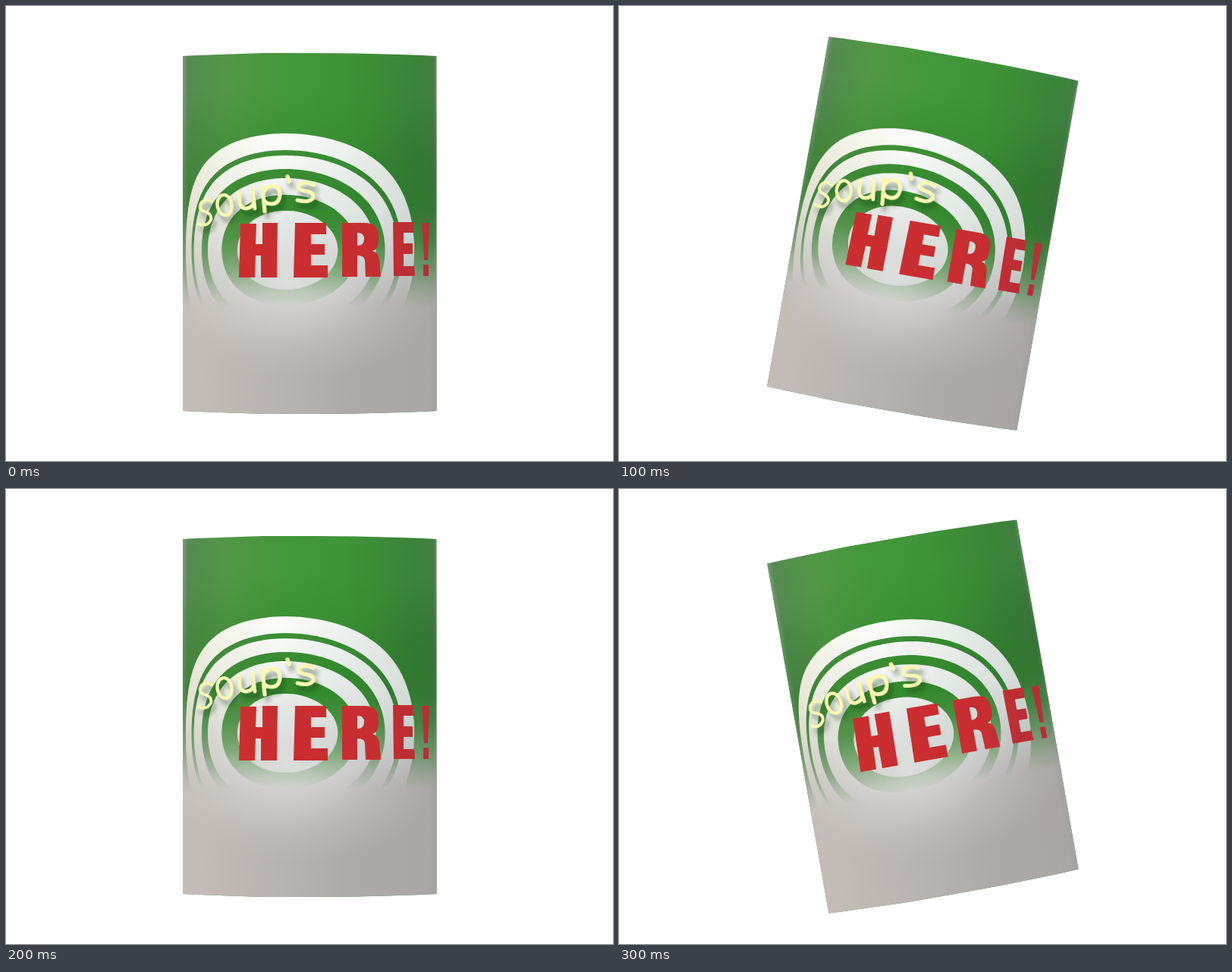
Write an HTML page that moves like this. It is 800 px wide and 600 px high and loops after 0.4 s.

```html
<!DOCTYPE html>
<html lang="en">
<head>
<meta charset="utf-8">
<title>Wobbling soup can</title>
<style>
  html, body { margin: 0; width: 100%; height: 100%; overflow: hidden; background: #fff; }
  svg { display: block; width: 100%; height: 100%; }
</style>
</head>
<body>
<svg viewBox="0 0 800 600" role="img" aria-label="Soup's HERE!">
  <defs>
    <clipPath id="body">
      <path d="M233 66L252 65L281 64L339 62H407L461 62.500L519 64L548 65L567.500 66V534L548 535L519 536L461 537.500L407 538H339L281 536L252 535L233 534Z"/>
    </clipPath>
    <linearGradient id="green" gradientUnits="userSpaceOnUse" x1="233" y1="0" x2="568" y2="0">
      <stop offset="0" stop-color="#7b9a78"/>
      <stop offset=".02" stop-color="#568a51"/>
      <stop offset=".18" stop-color="#529647"/>
      <stop offset=".4" stop-color="#43983a"/>
      <stop offset=".65" stop-color="#3f9338"/>
      <stop offset=".9" stop-color="#3b8439"/>
      <stop offset=".985" stop-color="#407f40"/>
      <stop offset="1" stop-color="#6a8c69"/>
    </linearGradient>
    <linearGradient id="depth" x1="0" y1="0" x2="0" y2="1">
      <stop offset=".15" stop-color="#1e761a" stop-opacity="0"/>
      <stop offset=".55" stop-color="#1e761a" stop-opacity=".38"/>
      <stop offset="1" stop-color="#1e761a" stop-opacity=".2"/>
    </linearGradient>
    <radialGradient id="shade" gradientUnits="userSpaceOnUse" cx="570" cy="225" r="110">
      <stop offset="0" stop-color="#35603a" stop-opacity=".35"/>
      <stop offset="1" stop-color="#35603a" stop-opacity="0"/>
    </radialGradient>
    <linearGradient id="white" gradientUnits="userSpaceOnUse" x1="236" y1="0" x2="540" y2="0">
      <stop offset="0" stop-color="#efebd4"/>
      <stop offset=".14" stop-color="#f6f6e9"/>
      <stop offset=".4" stop-color="#fbfcfa"/>
      <stop offset=".7" stop-color="#eef2ef"/>
      <stop offset="1" stop-color="#dbe1dd"/>
    </linearGradient>
    <linearGradient id="dim" gradientUnits="userSpaceOnUse" x1="0" y1="175" x2="0" y2="340">
      <stop offset="0" stop-color="#bfc9c4" stop-opacity="0"/>
      <stop offset="1" stop-color="#bfc9c4" stop-opacity=".45"/>
    </linearGradient>
    <linearGradient id="gray" gradientUnits="userSpaceOnUse" x1="233" y1="0" x2="568" y2="0">
      <stop offset="0" stop-color="#c3bcb4"/>
      <stop offset=".07" stop-color="#c2bcb7"/>
      <stop offset=".35" stop-color="#b8b4b2"/>
      <stop offset=".65" stop-color="#aeaaa8"/>
      <stop offset=".97" stop-color="#a9a6a5"/>
      <stop offset="1" stop-color="#a3a1a1"/>
    </linearGradient>
    <radialGradient id="glow" gradientUnits="userSpaceOnUse" cx="375" cy="365" r="200" gradientTransform="matrix(1 0 0 .65 0 128)">
      <stop offset="0" stop-color="#dfe0df" stop-opacity=".9"/>
      <stop offset=".4" stop-color="#d5d4d3" stop-opacity=".65"/>
      <stop offset="1" stop-color="#c0bdbb" stop-opacity="0"/>
    </radialGradient>
    <linearGradient id="fade" gradientUnits="userSpaceOnUse" x1="0" y1="270" x2="0" y2="396">
      <stop offset="0" stop-color="#000"/>
      <stop offset=".3" stop-color="#262626"/>
      <stop offset=".6" stop-color="#757575"/>
      <stop offset=".85" stop-color="#d4d4d4"/>
      <stop offset="1" stop-color="#fff"/>
    </linearGradient>
    <mask id="lower" maskUnits="userSpaceOnUse" x="230" y="60" width="340" height="480">
      <rect x="230" y="60" width="340" height="480" fill="url(#fade)"/>
    </mask>
    <linearGradient id="red" x1="0" y1="0" x2="1" y2="0">
      <stop offset="0" stop-color="#cc2e2f"/>
      <stop offset=".7" stop-color="#c72d31"/>
      <stop offset="1" stop-color="#b52f36"/>
    </linearGradient>
    <filter id="blur" x="-20%" y="-40%" width="140%" height="180%"><feGaussianBlur stdDeviation="3"/></filter>
    <!-- Hand lettering, wrapped around the can: strokes thin out towards the edge -->
    <g id="soup" fill="none" stroke-linecap="round" stroke-linejoin="round">
      <path stroke-width="3.800" d="M271 258Q263 252 257 260Q253 269 262 271Q272 274 270 282Q265 292 254 287"/>
      <ellipse stroke-width="4.300" cx="288" cy="262.500" rx="9.500" ry="13.500" transform="rotate(-8 288 262)"/>
      <path stroke-width="4.800" d="M307 246L308 259Q310 268 317 267Q326 266 327 256M325 242L328 267"/>
      <path stroke-width="5.200" d="M338 239L341 271M339 247Q342 237 351 237Q361 238 361 249Q360 261 350 261Q343 261 340 256"/>
      <path stroke-width="5.500" d="M371 225L373 231"/>
      <path stroke-width="5" d="M405 236Q394 230 387 235Q382 242 394 244Q407 246 405 253Q400 260 384 256"/>
    </g>
  </defs>

  <g id="can" clip-path="url(#body)">
    <rect x="230" y="60" width="340" height="480" fill="url(#green)"/>
    <rect x="230" y="60" width="340" height="340" fill="url(#depth)"/>
    <rect x="430" y="90" width="140" height="300" fill="url(#shade)"/>
    <path class="rings" fill="url(#white)" fill-rule="evenodd"/>
    <path class="rings" fill="url(#dim)" fill-rule="evenodd"/>
    <g mask="url(#lower)">
      <rect x="230" y="260" width="340" height="280" fill="url(#gray)"/>
      <rect x="230" y="230" width="340" height="310" fill="url(#glow)"/>
    </g>
    <use href="#soup" x="4" y="7" stroke="#123a12" opacity=".5" filter="url(#blur)"/>
    <use href="#soup" stroke="#faf7b2"/>
    <path fill="url(#red)" fill-rule="evenodd" d="
      M309 287H330L329 314H338V286H358L357 358H336V329H329L328 358H307Z
      M381 286H422V301H402V314H420V328H402V342H424V358H379Z
      M443 286H472Q491 286 491 303V309Q491 321 483 323Q491 325 492 335L494 357H474L473 336Q473 329 463 329V357H443Z
      M463 299V316Q472 316 472 307Q472 299 463 299Z
      M510 285H537V299H524V313H536V327H524V343H538L539 356H511Z
      M548 286H558L556 335H551Z M550 341H557V356H550Z"/>
  </g>
</svg>
<script>
  const RADIUS = 167, AXIS = 400, FACING = -0.19, RING_Y = 322;

  // Flat ellipse of the given height, wrapped around the can.
  function wrappedEllipse(height) {
    const spread = 0.0082 * height - 0.0000042 * height ** 2;
    const points = Array.from({ length: 120 }, (_, i) => {
      const a = i / 120 * 2 * Math.PI;
      const x = AXIS + RADIUS * Math.sin(FACING + spread * Math.cos(a));
      return `${x.toFixed(1)} ${(RING_Y + height * Math.sin(a)).toFixed(1)}`;
    });
    return `M${points.join('L')}Z`;
  }

  const outline = [154, 132, 125, 107, 95, 73, 52].map(wrappedEllipse).join('');
  document.querySelectorAll('.rings').forEach(ring => ring.setAttribute('d', outline));

  const can = document.getElementById('can');
  const tilts = [0, 10, 0, -10];
  const start = performance.now();

  function draw() {
    const step = Math.floor((performance.now() - start) / 100) % tilts.length;
    can.setAttribute('transform', `rotate(${tilts[step]} 400 300)`);
    requestAnimationFrame(draw);
  }
  draw();
</script>
</body>
</html>
```
